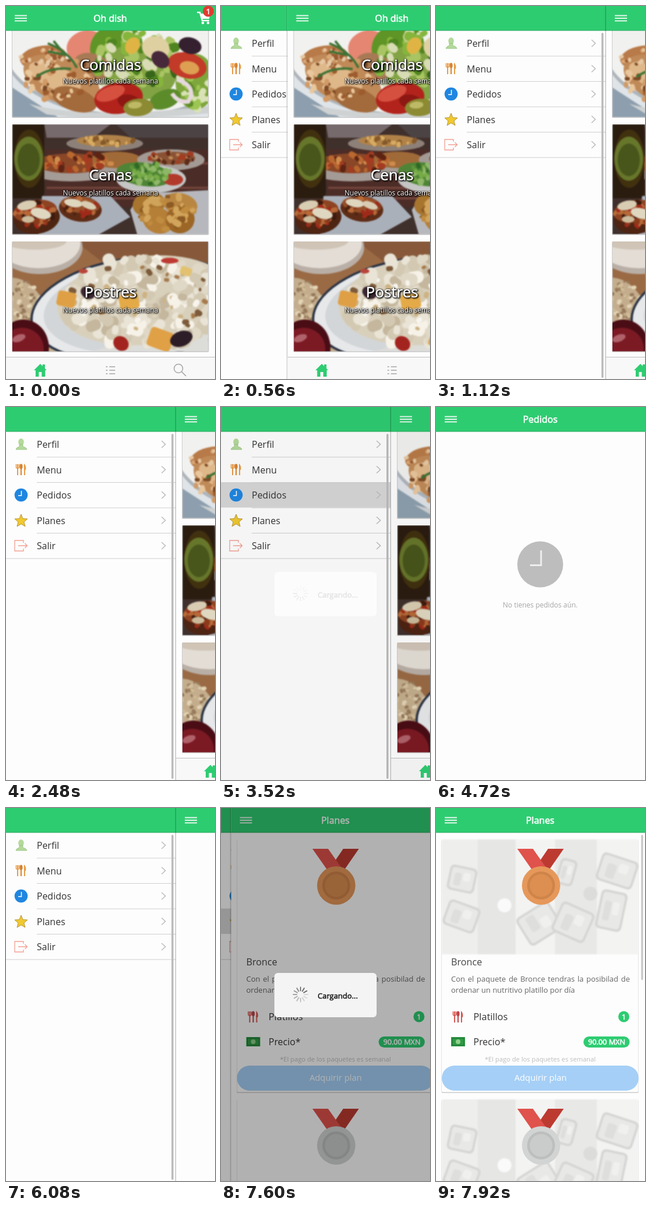
Recreate the animation shown at these times as an HTML page. Size 360x640 px, loop 8000 ms.

```html
<!DOCTYPE html>
<html lang="es">
<head>
<meta charset="utf-8">
<style>
html, body { margin: 0; width: 100%; height: 100%; overflow: hidden; background: #fdfdfd; }
svg { display: block; width: 360px; height: 640px; }
text, .par { font-family: "Open Sans", "Noto Sans", sans-serif; }
.bold { stroke: currentColor; stroke-width: .6; }
.photo text { fill: #fff; filter: drop-shadow(1px 1px 1px #000) drop-shadow(0 0 1px #000); }
.par { font-size: 13px; line-height: 19px; color: #666; text-align: justify; }
.soft { filter: blur(1.2px); }
</style>
</head>
<body>
<svg id="stage" viewBox="0 0 360 640" xmlns="http://www.w3.org/2000/svg"></svg>
<script>
const LOOP = 8000, OPEN = 293, GREEN = '#2ecc71';

// ---- markup helpers
const text = (x, y, s, size, fill, extra = '') =>
  `<text x="${x}" y="${y}" font-size="${size}" fill="${fill}" ${extra}>${s}</text>`;
const mid = 'text-anchor="middle"';
const heavy = 'class="bold" color="#fff"';
const rect = (x, y, w, h, fill, extra = '') =>
  `<rect x="${x}" y="${y}" width="${w}" height="${h}" fill="${fill}" ${extra}/>`;
const path = (d, fill, extra = '') => `<path d="${d}" fill="${fill}" ${extra}/>`;
const line = (d, color, w, extra = '') =>
  path(d, 'none', `stroke="${color}" stroke-width="${w}" ${extra}`);
const disc = (x, y, r, fill, extra = '') => `<circle cx="${x}" cy="${y}" r="${r}" fill="${fill}" ${extra}/>`;
const oval = (x, y, rx, ry, fill, turn = 0, extra = '') =>
  `<ellipse cx="${x}" cy="${y}" rx="${rx}" ry="${ry}" fill="${fill}" transform="rotate(${turn} ${x} ${y})" ${extra}/>`;
const box = (x, y, w, h, fill, turn, r = 8) =>
  rect(x - w / 2, y - h / 2, w, h, fill, `rx="${r}" transform="rotate(${turn} ${x} ${y})"`);
const ovals = list => list.map(a => oval(...a)).join('');

function seeded(seed) {
  return () => (seed = (seed * 16807) % 2147483647) / 2147483647;
}
// small chips scattered over an oval area
function scatter(n, seed, cx, cy, rx, ry, size, colors) {
  const rnd = seeded(seed);
  let out = '';
  for (let i = 0; i < n; i++) {
    const a = rnd() * 6.283, q = Math.sqrt(rnd()), s = size * (.6 + rnd() * .8);
    out += box((cx + Math.cos(a) * q * rx).toFixed(1), (cy + Math.sin(a) * q * ry).toFixed(1),
      s.toFixed(1), (s * .7).toFixed(1), colors[Math.floor(rnd() * colors.length)], Math.round(rnd() * 180), s / 3);
  }
  return out;
}

// ---- photos
const salad = () =>
  rect(11, 2, 338, 189, '#dfe4e8') +
  path('M11 72L32 64L42 76L11 88Z', '#5f93c6') +
  path('M11 140L90 191H11Z', '#8d9fae') +
  oval(195, 86, 200, 106, '#aeb5bb', 4) + oval(195, 82, 197, 103, '#f1f1ef', 4) +
  path('M40 168Q140 196 349 172V184Q180 200 70 186Z', '#cfd2d3') +
  ovals([
    [138, 70, 34, 28, '#e58672', -15], [190, 70, 46, 40, '#5f9526', -20],
    [232, 112, 62, 48, '#82a344', 10], [326, 130, 34, 48, '#7ea63c', 0],
    [150, 104, 34, 22, '#a77a55', 20],
    [64, 88, 40, 20, '#b87a48', -8], [96, 128, 70, 38, '#c08a58', 24],
    [84, 122, 48, 20, '#dfb88a', 24], [118, 160, 40, 20, '#a36a3b', 18]
  ]) +
  scatter(46, 7, 92, 126, 64, 36, 10, ['#9c5c2e', '#e9c79c', '#d19a66', '#7d4a26']) +
  scatter(24, 13, 62, 88, 36, 16, 8, ['#d9a878', '#9a5a30', '#e6c8a4']) +
  scatter(70, 23, 232, 100, 78, 54, 17, ['#4f8420', '#86b53c', '#a9c563', '#d8dcb4', '#38661a']) +
  scatter(26, 29, 326, 132, 28, 46, 14, ['#9cc552', '#5c8a28', '#d9e2b6']) +
  ovals([
    [194, 158, 42, 27, '#b2231c', -8], [180, 150, 26, 12, '#d6503f', -20], [212, 164, 20, 12, '#8d1712', 10],
    [258, 72, 24, 20, '#dfd0a2', 15], [218, 68, 12, 15, '#e0b444', 30],
    [312, 102, 34, 22, '#c23a28', 14], [316, 106, 17, 11, '#dd9f52', 14],
    [317, 68, 20, 14, '#35202f', 15], [266, 92, 17, 13, '#47283a', 40],
    [274, 160, 28, 16, '#5c8c2a', -20],
    [228, 174, 26, 15, '#8c8a32', -5], [222, 170, 12, 6, '#bdb965', -5]
  ]) +
  line('M294 126Q330 138 314 164Q296 166 286 150', '#e6d8de', 7) +
  line('M72 64Q108 78 122 106M82 60L100 82M72 78L104 84M52 122Q76 104 112 108', '#3f7335', 4);

const dinner = () =>
  rect(11, 203, 338, 189, '#40302c') +
  path('M66 203H180L150 226H70Z', '#766a6c') + path('M190 203H349V226H215Z', '#4c4444') +
  path('M68 246H349V345H68Z', '#4b2c26') +
  line('M70 312H349M70 330H349M300 270H349', '#70423a', 4) +
  ovals([
    [170, 236, 66, 13, '#8d8078'], [172, 231, 50, 10, '#b08248'],
    [112, 278, 84, 23, '#a49b96'], [112, 270, 62, 17, '#8a4728'], [190, 264, 44, 14, '#a06a38'],
    [284, 264, 58, 18, '#a39a94'], [286, 261, 40, 11, '#8a5234'],
    [250, 297, 60, 24, '#c5c5c5'], [238, 289, 48, 20, '#4f8436', 8], [288, 298, 17, 10, '#b23a2c']
  ]) +
  scatter(44, 11, 124, 269, 64, 15, 11, ['#5e2413', '#b9682f', '#d08b4b', '#a33c20']) +
  scatter(26, 17, 286, 260, 40, 10, 9, ['#5e2c1a', '#c08a58', '#a33c20']) +
  scatter(20, 37, 174, 231, 48, 8, 8, ['#d8ab62', '#85592a']) +
  scatter(46, 19, 238, 288, 44, 18, 9, ['#76ab45', '#2f6a24', '#5c963a', '#8fb768']) +
  path('M11 203H66V318Q66 328 58 330H11Z', '#2b1c10') +
  oval(40, 262, 26, 50, '#41310f') + oval(39, 262, 25, 38, '#66762a') + oval(39, 264, 19, 28, '#48561c') +
  path('M62 326L180 326L214 362L160 392H56Z', '#aab0ba') +
  path('M214 350L232 322L349 316V392H226Z', '#b7b8bd') +
  ovals([
    [53, 364, 40, 27, '#4e2412', -8], [50, 352, 38, 19, '#8e4322', -8],
    [128, 348, 37, 22, '#5e2c16', 6], [128, 341, 34, 14, '#97502a', 6]
  ]) +
  scatter(40, 5, 50, 356, 36, 22, 10, ['#8c3a1c', '#3d1a0e', '#b76a38', '#a02a1a']) +
  scatter(34, 9, 128, 345, 33, 17, 9, ['#8c3a1c', '#4b220f', '#b76a38', '#a02a1a']) +
  ovals([
    [36, 342, 17, 8, '#d8cdb2', -12], [60, 356, 18, 9, '#e0d7c0', 14], [38, 366, 11, 6, '#cbbb9a', 0],
    [116, 338, 16, 7, '#dfd6be', 10], [142, 342, 14, 6, '#d8cdb2', 20],
    [246, 340, 28, 21, '#a8752f', -10], [300, 340, 30, 19, '#b98642', 12],
    [262, 368, 27, 22, '#b67f38', 20], [300, 366, 25, 24, '#9c6626', -20], [258, 334, 14, 9, '#cfa35a', 20]
  ]) +
  scatter(34, 41, 276, 354, 48, 30, 12, ['#d2a55c', '#8c5a22', '#c08c40']);

const dessert = () =>
  rect(11, 404, 338, 189, '#9a6a45') +
  path('M120 404H349V440L180 450Z', '#87593a') +
  path('M11 466Q70 470 90 593H11Z', '#c3ad8c') +
  oval(58, 414, 74, 46, '#b9afa6') + oval(56, 408, 72, 42, '#e3ddd5') + oval(50, 404, 54, 14, '#cfc4b6') +
  scatter(50, 31, 36, 506, 28, 36, 7, ['#e3d4b6', '#96795a', '#d2bd98']) +
  oval(225, 520, 182, 88, '#e6e8ea', -7, 'stroke="#2c3444" stroke-width="4"') +
  oval(232, 516, 168, 78, '#d3d6d9', -7) +
  path('M150 593Q210 570 349 540V593Z', '#dcdcd9') +
  oval(240, 505, 152, 76, '#d9d0bc', -6) +
  scatter(170, 42, 240, 508, 144, 76, 22, ['#e9e4d6', '#f6f2e8', '#d3c9b2', '#e0d8c6', '#c4b79d']) +
  scatter(44, 77, 240, 500, 128, 64, 10, ['#a67a4c', '#cdb384', '#7d5a3a', '#f8f5ee']) +
  box(104, 503, 32, 26, '#dfa045', 12, 5) + box(212, 507, 34, 26, '#e4aa48', -10, 5) +
  box(266, 572, 42, 34, '#e0a045', 20, 6) + box(310, 455, 20, 14, '#e2c270', 20, 4) +
  ovals([
    [141, 492, 13, 10, '#3a2630', 30], [302, 571, 20, 13, '#2d1d26', -20],
    [282, 437, 15, 5, '#bd3a32'], [198, 579, 14, 12, '#a3241f', 40], [133, 455, 8, 4, '#b8443a'],
    [30, 586, 44, 48, '#4a0d15'], [28, 588, 37, 36, '#7c1a24'], [22, 570, 12, 6, '#b0626a', -20]
  ]);

function photo(i, y, art, title, base) {
  return `<g class="photo">${rect(10, y, 339.5, 190, '#ccc', 'rx="2"')}
    <clipPath id="c${i}">${rect(11, y, 337, 188.5, '#000')}</clipPath>
    <g clip-path="url(#c${i})"><g class="soft">${art()}</g></g>
    ${text(180, base, title, 26, '#fff', mid + ' ' + heavy)}
    ${text(180, base + 26 - (i ? 0 : 3), 'Nuevos platillos cada semana', 11.9, '#fff', mid)}</g>`;
}

// ---- pages
const bars = line('M15 16.5H36M15 21H36M15 25.5H36', '#e2f7ea', 2);
const header = title => rect(0, 0, 360, 42, GREEN) + rect(0, 41.5, 360, 1, '#27a85d') + bars +
  text(179.5, 27, title, 16, '#fff', mid + ' ' + heavy);

const home = () =>
  photo(0, 2, salad, 'Comidas', 110) + photo(1, 203, dinner, 'Cenas', 299) +
  photo(2, 404, dessert, 'Postres', 500) + header('Oh dish') +
  line('M329 11H334L338 25H350', '#fff', 2.4) +
  path('M335 14H351L349 21H337Z', '#fff', 'stroke="#fff" stroke-width="2"') +
  disc(339, 29, 2.3, '#fff') + disc(348, 29, 2.3, '#fff') +
  disc(348.5, 9, 9.5, '#e03c31') + text(348.5, 14, '1', 13, '#fff', mid + ' ' + heavy) +
  rect(0, 602, 360, 38, '#f8f8f8') + rect(0, 602, 360, 1, '#bdbdbd') +
  path('M48 625L59 614L63 618V615H67V622L70 625H67.5V636H61.5V628H56.5V636H51V625Z', GREEN) +
  line('M172 619H175M172 625H175M172 631H175M178 619H188M178 625H188M178 631H188', '#a5a5a5', 1.5) +
  disc(297, 622, 7.5, 'none', 'stroke="#a5a5a5" stroke-width="1.5"') + line('M302.5 627.5L310 635', '#a5a5a5', 1.7);

const orders = () => header('Pedidos') +
  disc(179.5, 270, 39.5, '#bdbdbd') + line('M181 246V271.5H162', '#eee', 3) +
  text(179.5, 344, 'No tienes pedidos aún.', 12, '#a5a5a5', mid);

const lunchboxes = () =>
  rect(10, 54, 338, 197, '#f3f3f2') + rect(10, 54, 62, 197, '#eeeeed') + rect(72, 54, 65, 197, '#e6e6e5') +
  rect(205, 54, 72, 197, '#e8e8e7') +
  [[45, 122, 48, 44, 12], [44, 186, 58, 46, 20], [178, 198, 66, 56, -32], [236, 196, 62, 56, 24],
   [225, 110, 30, 46, 15], [312, 108, 66, 50, 18], [302, 176, 46, 68, 12]]
    .map(([x, y, w, h, a]) => box(x, y, w, h, '#d6d6d5', a) + box(x, y, w - 8, h - 8, '#e8e8e7', a, 5) +
      box(x - w / 6, y, w / 4, h / 2, '#dededc', a, 4) + box(x + w / 6, y - 3, w / 4, h / 3, '#f0f0ee', a, 4)).join('') +
  disc(118, 167, 12, '#fafafa') + disc(266, 147, 12, '#dcdcda');

const medal = (outer, ring, inner) =>
  path('M193 70H220L195 106L178 92Z', '#bd3a31') + path('M140 70H167L193 107H166Z', '#e0524c') +
  disc(181, 133, 33, outer) + disc(181, 133, 24, ring) + disc(181, 133, 19.5, inner);

const forks = (x, y, c1, c2) =>
  line(`M${x - 6} ${y - 9}V${y + 10}M${x + 6} ${y - 2}V${y + 10}`, c1, 2) +
  line(`M${x - 8.5} ${y - 9}V${y - 3}Q${x - 6} ${y} ${x - 3.5} ${y - 3}V${y - 9}`, c1, 1.5) +
  oval(x, y - 5, 2.6, 4.5, c2) + line(`M${x} ${y - 2}V${y + 10}`, c2, 2) +
  path(`M${x + 5} ${y - 10}Q${x + 9.5} ${y - 6} ${x + 8} ${y + 1}H${x + 5}Z`, c1);

const planCard = art =>
  rect(9.5, 55, 339.5, 434, '#ccc', 'rx="2"') + rect(10, 54, 338.5, 433.5, '#fdfdfd', 'rx="2"') +
  `<g class="art soft">${lunchboxes()}</g>` + art;

const plans = () =>
  planCard(medal('#e6985a', '#cf8449', '#dc8f51')) +
  text(26, 270, 'Bronce', 16.2, '#444') +
  `<foreignObject x="26" y="283.5" width="308" height="44"><div class="par" xmlns="http://www.w3.org/1999/xhtml">Con el paquete de Bronce tendras la posibilad de ordenar un nutritivo platillo por día</div></foreignObject>` +
  forks(38, 358, '#d9574f', '#b9454a') + text(64.5, 364, 'Platillos', 16.4, '#333') +
  disc(323.5, 358, 9.5, GREEN) + text(323.5, 363, '1', 12.5, '#fff', mid + ' ' + heavy) +
  rect(26, 393, 24, 16, '#2f9a46') + rect(28, 395, 20, 12, 'none', 'stroke="#1d7031"') + disc(38, 401, 4, '#8fd08a') +
  text(64.5, 407, 'Precio*', 16, '#333') + rect(254, 392, 79.5, 19, GREEN, 'rx="9.5"') +
  text(294, 406, '90.00 MXN', 12.7, '#fff', mid + ' ' + heavy) +
  text(179.5, 435, '*El pago de los paquetes es semanal', 11.2, '#bdbdbd', mid) +
  rect(10, 442, 339, 43, '#a5cff6', 'rx="21.5"') + text(180, 468, 'Adquirir plan', 14.8, '#fff', mid) +
  `<g transform="translate(0 446)">${planCard(medal('#d2d4d3', '#bcbfbe', '#cacccb'))}</g>` +
  rect(353.5, 46, 3, 249, '#c4c4c4', 'rx="1.5"') + header('Planes');

// ---- side menu
const icons = [
  oval(26, 60, 4.8, 6, '#b4d99b') + path('M23 64H29V68Q35 69 36 73H17Q18 69 23 68Z', '#b4d99b', 'stroke="#8fbb76" stroke-width=".7"'),
  forks(26, 107, '#e79b45', '#d9822f'),
  disc(26, 151, 11.3, '#1f86e0') + line('M26.5 144V152H21', '#fff', 1.5),
  path('M26 184L29 191.5L37 192L31 197.2L33 205L26 200.7L19 205L21 197.2L15 192L23 191.5Z', '#f0c92f', 'stroke="#b8943a" stroke-width="1"'),
  line('M30 233V229H15V247H30V243M21 238H36.5M32.5 234L36.5 238L32.5 242', '#f2a094', 1.3)
];
const menu = () =>
  rect(0, 0, 360, 640, '#fdfdfd') + rect(0, 0, 360, 42, GREEN) + rect(0, 41.5, 360, 1, '#27a85d') +
  rect(0, 0, 292, 43.5, '#d6d6d6', 'id="pick"') +
  ['Perfil', 'Menu', 'Pedidos', 'Planes', 'Salir'].map((s, i) => {
    const y = 64 + i * 43.5, x = i < 4 ? 53 : 0;
    return icons[i] + text(53, y + 6, s, 16, '#333') +
      line(`M268 ${y - 6}L274.5 ${y}L268 ${y + 6}`, '#bcbcbc', 1.5) + rect(x, y + 21.5, 292 - x, 1, '#cfcfcf');
  }).join('') + rect(285, 46, 3.5, 592, '#bbb', 'rx="1.7"');

// ---- stage
const spokes = Array.from({ length: 12 }, (_, i) =>
  `<line class="spoke" x1="137" y1="313.5" x2="137" y2="307.5" stroke="#666" stroke-width="2" stroke-linecap="round" transform="rotate(${i * 30} 137 320)"/>`).join('');

const stage = document.getElementById('stage');
stage.innerHTML =
  `<linearGradient id="edge"><stop stop-color="#000" stop-opacity="0"/><stop offset="1" stop-color="#000" stop-opacity=".28"/></linearGradient>
  <g>${menu()}</g>
  <g id="page">${rect(-2.5, 0, 2.5, 640, 'url(#edge)')}${rect(0, 0, 360, 640, '#fdfdfd')}
    ${[home, orders, plans].map(p => `<g class="view">${p()}</g>`).join('')}</g>
  <g id="load">${rect(0, 0, 360, 640, '#000', 'opacity=".3"')}${rect(92, 283, 176, 76, '#f4f4f4', 'rx="6"')}
    ${spokes}${text(166.5, 327, 'Cargando...', 13, '#222', 'class="bold" color="#222"')}</g>`;

const all = s => [...stage.querySelectorAll(s)];
const [page, load, pick] = ['#page', '#load', '#pick'].map(s => stage.querySelector(s));
const views = all('.view'), arts = all('.art'), spokeEls = all('.spoke');

const clamp = v => Math.max(0, Math.min(1, v));
const ramp = (t, a, b) => clamp((t - a) / (b - a));
const out = p => 1 - (1 - p) ** 3;
const show = (el, on) => el.setAttribute('visibility', on ? 'visible' : 'hidden');

function draw(t) {
  const slide = out(ramp(t, 500, 900)) - out(ramp(t, 3776, 4106)) +
    out(ramp(t, 5580, 5920)) - out(ramp(t, 7400, 7730));
  page.setAttribute('transform', `translate(${(slide * OPEN).toFixed(2)} 0)`);

  const now = t < 3760 ? 0 : t < 7400 ? 1 : 2;
  views.forEach((v, i) => v.setAttribute('display', i === now ? 'inline' : 'none'));
  arts.forEach(a => a.setAttribute('display', t >= 7720 ? 'inline' : 'none'));

  const second = t > 7000;
  show(pick, (t >= 3440 && t < 4400) || t >= 7360);
  pick.setAttribute('y', second ? 172.5 : 129);

  const fade = second ? ramp(t, 7370, 7520) - ramp(t, 7700, 7860)
    : ramp(t, 3500, 3700) - ramp(t, 4040, 4220);
  load.setAttribute('opacity', fade.toFixed(3));
  show(load, fade > 0);
  const head = 2 + Math.floor((t - (second ? 7600 : 3920)) / 1000 * 12);
  spokeEls.forEach((s, i) => {
    const age = (((head - i) % 12) + 12) % 12;
    s.setAttribute('opacity', Math.max(.2, 1 - age * .085).toFixed(2));
  });
}

const start = performance.now();
function tick() {
  draw((performance.now() - start) % LOOP);
  requestAnimationFrame(tick);
}
tick();
</script>
</body>
</html>
```
